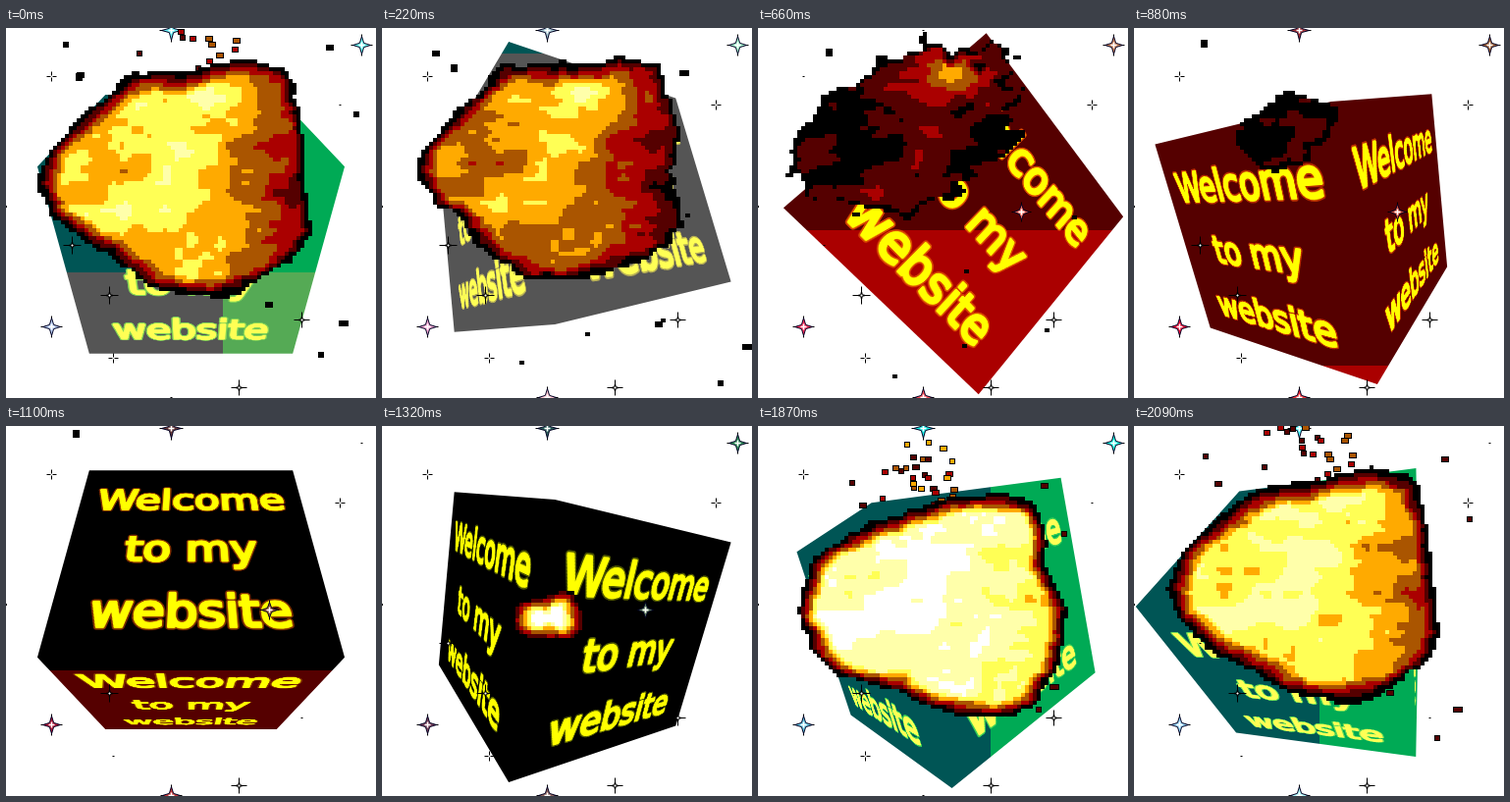
An HTML page with a canvas that plays this animation: 377 by 377 pixels, repeating every 2.2 s.

```html
<!DOCTYPE html>
<html lang="en">
<head>
<meta charset="utf-8">
<title>Welcome cube</title>
<style>
  html, body { margin: 0; width: 100%; height: 100%; overflow: hidden; background: #fff; }
  #stage { position: relative; width: 377px; height: 377px; overflow: hidden; }
  canvas { position: absolute; left: 0; top: 0; }
  .face { position: absolute; left: 0; top: 0; width: 400px; height: 400px; transform-origin: 0 0; }
  .face text {
    font: 37px "DejaVu Sans", sans-serif; text-anchor: middle;
    stroke-linejoin: round; fill: var(--ink); stroke: var(--ink); stroke-width: 2.6px;
  }
  .face .halo text { stroke: var(--halo); stroke-width: 5px; }
</style>
</head>
<body>
<div id="stage"></div>
<script>
const SIZE = 377, MID = SIZE / 2, STEP = 110, COUNT = 20;
const FOCAL = 331.6, EYE = 3.5, CELL = 4;
const TAU = Math.PI * 2;
const stage = document.getElementById('stage');
const clamp = (v, lo, hi) => Math.max(lo, Math.min(hi, v));
const mix = (a, b, k) => a + (b - a) * k;
const rgb = (...c) => `rgb(${c.map(v => Math.round(clamp(v, 0, 255))).join()})`;
const wave = (i, peak) => Math.cos((i - peak) / COUNT * TAU);

function addCanvas() {
  const c = document.createElement('canvas');
  c.width = c.height = SIZE;
  stage.append(c);
  return c.getContext('2d');
}

// Each face: normal, text direction, text up.
const FACES = [
  [[0, 0, 1], [1, 0, 0], [0, 1, 0]],
  [[0, 0, -1], [-1, 0, 0], [0, 1, 0]],
  [[1, 0, 0], [0, 0, -1], [0, 1, 0]],
  [[-1, 0, 0], [0, 0, 1], [0, 1, 0]],
  [[0, 1, 0], [0, 0, -1], [-1, 0, 0]],
  [[0, -1, 0], [0, 0, 1], [-1, 0, 0]]
];
const lines = ['Welcome', 'to my', 'website']
  .map((s, n) => `<text x="100" y="${57 + n * 60}">${s}</text>`).join('');

const back = addCanvas();
const labels = FACES.map(() => {
  stage.insertAdjacentHTML('beforeend',
    `<svg class="face" viewBox="0 0 200 200"><g class="halo">${lines}</g><g>${lines}</g></svg>`);
  return stage.lastElementChild;
});
const front = addCanvas();

// Colour of the cube: red grows downwards, green to the right, both swing in time.
const redWave = i => wave(i, 5), greenWave = i => wave(i, 18.65);
const level = (pos, w) => (pos + 380 * w - 249) / 318 + 1;
const blueOn = i => wave(i, 19) > 0.55;

function bands(w) {
  const cuts = [249, 567].map(c => clamp(Math.round(c - 380 * w), 0, SIZE));
  return [[0, cuts[0], 0], [cuts[0], cuts[1], 85], [cuts[1], SIZE, 170]].filter(b => b[1] > b[0]);
}

function rotator(i) {
  const roll = -Math.cos(i / 10 * TAU), yaw = (i - 15) / COUNT * TAU;
  const cr = Math.cos(roll), sr = Math.sin(roll), cy = Math.cos(yaw), sy = Math.sin(yaw);
  return ([x, y, z]) => {
    const u = x * cr - y * sr, v = x * sr + y * cr;
    return [u * cy + z * sy, -v, z * cy - u * sy];
  };
}

function drawCube(i) {
  const turn = rotator(i);
  back.clearRect(0, 0, SIZE, SIZE);
  back.save();
  back.beginPath();
  FACES.forEach((face, n) => {
    const [normal, right, up] = face.map(turn);
    const visible = normal[2] * EYE > 1;
    labels[n].style.display = visible ? '' : 'none';
    if (!visible) return;
    [[-1, -1], [1, -1], [1, 1], [-1, 1]].forEach(([a, b], k) => {
      const p = normal.map((v, d) => v + a * right[d] + b * up[d]);
      const s = FOCAL / (EYE - p[2]);
      back[k ? 'lineTo' : 'moveTo'](MID + p[0] * s, MID + p[1] * s);
    });
    back.closePath();
    // Homogeneous columns for x, y and the origin of the 400px label.
    const column = (v, w) => [FOCAL * v[0] + MID * w, FOCAL * v[1] + MID * w, 0, w];
    const dx = right.map(v => v / 200), dy = up.map(v => -v / 200);
    const origin = normal.map((v, d) => v - right[d] + up[d]);
    labels[n].style.transform = `matrix3d(${[
      ...column(dx, -dx[2]), ...column(dy, -dy[2]), 0, 0, 1, 0, ...column(origin, EYE - origin[2])
    ].map(v => v.toFixed(7))})`;
  });
  back.clip();
  const blue = blueOn(i) ? 85 : 0;
  for (const [y0, y1, red] of bands(redWave(i)))
    for (const [x0, x1, green] of bands(greenWave(i))) {
      back.fillStyle = rgb(red, green, blue);
      back.fillRect(x0, y0, x1 - x0, y1 - y0);
    }
  back.restore();
  stage.style.setProperty('--ink', rgb(255, 255, blue));
  stage.style.setProperty('--halo', rgb(130 + 90 * redWave(i), 130 + 90 * greenWave(i), blue));
}

// Stars: x, y, arm length, steps at which they go dim.
const STARS = [
  [168, 2, 12, [6, 14]], [362, 17, 11, [10, 19]], [46, 304, 11, [4]],
  [168, 376, 11, [0, 17]], [46, 49, 5, [6, 14]], [340, 78, 5, [0, 17]],
  [105, 272, 9, [14]], [67, 221, 9, [6, 10, 14, 17, 19]], [301, 297, 8, [10, 19]],
  [109, 336, 5, [10, 19]], [237, 366, 8, [4]], [268, 187, 10, [0, 4, 17, 19]]
];

function drawStar([x, y, arm, dim], i) {
  front.save();
  front.translate(x + 0.5, y + 0.5);
  if (dim.includes(i)) {
    front.fillStyle = '#000';
    front.fillRect(-1, -0.5, 2, 1);
    front.restore();
    return;
  }
  const cross = (len, width, color) => {
    front.fillStyle = color;
    front.fillRect(-len, -width / 2, len * 2, width);
    front.fillRect(-width / 2, -len, width, len * 2);
  };
  cross(arm, 1, '#000');
  if (arm > 9) {
    const color = rgb(85 + 85 * level(y, redWave(i)), 85 + 85 * level(x, greenWave(i)), 150 + 100 * wave(i, 19));
    front.beginPath();
    for (let k = 0; k < 8; k++) {
      const r = k % 2 ? 3 : arm - 2;
      front.lineTo(r * Math.cos(k * TAU / 8), r * Math.sin(k * TAU / 8));
    }
    front.closePath();
    front.fillStyle = color;
    front.strokeStyle = '#002';
    front.fill();
    front.stroke();
    cross(3, 1.5, '#fff');
  } else if (arm > 5) cross(3, 2, '#000');
  cross(1, 1, '#fff');
  front.restore();
}

// Fire: outline radii clockwise from the right, with heat, cooling to the right and a hot spot.
const HEAT = ['#000', '#500', '#a00', '#a50', '#fa0', '#ff5', '#ffa', '#fff'];
const KEYS = [
  { at: 14, x: 170, y: 195, heat: 8.3, cool: 0, spot: 0, rough: 0.06,
    r: [105, 110, 99, 76, 72, 74, 92, 108, 112, 107, 82, 66, 70, 89, 106, 103] },
  { at: 17, x: 180, y: 185, heat: 6.9, cool: 1.1, spot: 0, rough: 0.07,
    r: [135, 134, 143, 113, 103, 87, 105, 130, 135, 128, 110, 97, 105, 124, 147, 118] },
  { at: 20, x: 180, y: 155, heat: 5.1, cool: 2.4, spot: 0.5, rough: 0.08,
    r: [125, 140, 130, 122, 115, 106, 102, 128, 144, 128, 112, 119, 107, 130, 149, 130] },
  { at: 24, x: 170, y: 135, heat: 3.1, cool: 2.2, spot: 2.3, rough: 0.14,
    r: [122, 143, 120, 100, 102, 106, 104, 92, 128, 114, 102, 115, 105, 107, 138, 138] },
  { at: 26, x: 150, y: 110, heat: 1, cool: 0.6, spot: 2.8, rough: 0.35,
    r: [112, 75, 78, 70, 80, 86, 95, 108, 108, 98, 70, 75, 90, 103, 120, 125] }
];

function hash(x, y) {
  let h = Math.imul(x, 374761393) + Math.imul(y, 668265263);
  h = Math.imul(h ^ (h >>> 13), 1274126177);
  return ((h ^ (h >>> 16)) >>> 0) / 4294967296;
}
function smooth(x, y) {
  const a = Math.floor(x), b = Math.floor(y), ease = t => t * t * (3 - 2 * t);
  const u = ease(x - a), v = ease(y - b);
  return mix(mix(hash(a, b), hash(a + 1, b), u), mix(hash(a, b + 1), hash(a + 1, b + 1), u), v);
}
const noise = (x, y) => 0.62 * smooth(x / 36, y / 24) + 0.38 * smooth(x / 14 + 50, y / 8 + 50);

function fireState(e) {
  const last = KEYS.length - 1;
  const n = clamp(KEYS.findIndex(k => k.at > e) - 1, 0, last);
  if (e >= KEYS[last].at) {
    const fade = 1 - (e - 26) / 3.5;
    return { ...KEYS[last], heat: fade, spot: 2.8 * fade, r: KEYS[last].r.map(v => v * fade) };
  }
  if (e < KEYS[0].at) return { ...KEYS[0], r: KEYS[0].r.map(v => v * (e - 11) / 3) };
  const a = KEYS[n], b = KEYS[n + 1], k = (e - a.at) / (b.at - a.at), out = {};
  for (const name in a) out[name] = name === 'r' ? a.r.map((v, j) => mix(v, b.r[j], k)) : mix(a[name], b[name], k);
  return out;
}

function drawFire(e) {
  const s = fireState(e), drift = (e - 20) * 3;
  const spotX = mix(203, 192, clamp((e - 24) / 2, 0, 1)), spotY = mix(75, 40, clamp((e - 24) / 2, 0, 1));
  const rim = e < 18 ? 3 : 4;
  for (let y = 2; y < SIZE; y += CELL)
    for (let x = 2; x < SIZE; x += CELL) {
      const dx = x - s.x, dy = y - s.y;
      const turn = (Math.atan2(dy, dx) / TAU + 1) % 1 * 16, j = Math.floor(turn);
      const n = noise(x, y + drift + 200) - 0.5;
      const radius = mix(s.r[j % 16], s.r[(j + 1) % 16], turn - j) * (1 + s.rough * 1.6 * n);
      const depth = radius - Math.hypot(dx, dy) + 2;
      if (depth < 0) continue;
      const spot = s.spot * Math.exp(-((x - spotX) ** 2 + (y - spotY) ** 2) / 1300);
      const inside = s.heat + 3 * (noise(x + 300, y + drift) - 0.5) + spot - s.cool * Math.max(0, (x - 205) / 75);
      const heat = clamp(Math.floor(Math.min(inside, depth / rim - 0.4)), 0, 7);
      front.fillStyle = HEAT[heat];
      front.fillRect(x - 2, y - 2, CELL, CELL);
    }
}

function chunk(x, y, w, h, core) {
  front.fillStyle = '#000';
  front.fillRect(Math.round(x - w / 2), Math.round(y - h / 2), w, h);
  if (core) {
    front.fillStyle = core;
    front.fillRect(Math.round(x - w / 2) + 1, Math.round(y - h / 2) + 1, w - 2, h - 2);
  }
}

const SHARDS = [[61, 17], [76, 48], [344, 301], [321, 333], [268, 282], [290, 65], [357, 88], [330, 20]];
const EMBERS = [[290, 303], [210, 318], [317, 192], [212, 245], [141, 348]];

function drawDebris(e) {
  const fly = ([x, y], k) => [x + (x - 190) * k, y + (y - 170) * k];
  if (e >= 15 && e <= 22)
    SHARDS.forEach((p, n) => chunk(...fly(p, 0.09 * (e - 20)), 6 + n % 3 * 2, 6, e < 20 ? '#500' : ''));
  if (e >= 22 && e <= 27) EMBERS.forEach(p => chunk(...fly(p, 0.02 * (e - 24)), 5, 4));
  if (e >= 20) chunk(73 - 0.3 * (e - 24), 33 - 4.2 * (e - 24), 7, 8);
  if (e >= 14 && e <= 21)
    for (let n = 0; n < 30; n++) {
      const spread = 30 + (e - 14) * 6;
      const x = 168 + (e - 17) * 8 + (hash(n, 3) + hash(n, 9) - 1) * spread;
      const y = 60 - (e - 17) * 18 + (hash(n, 5) + hash(n, 7) - 1) * spread;
      chunk(x, y, 6 + n % 3, 6, HEAT[1 + n % (e < 19 ? 4 : 3)]);
    }
}

function draw(i) {
  const e = i < 12 ? i + COUNT : i;
  drawCube(i);
  front.clearRect(0, 0, SIZE, SIZE);
  STARS.forEach(star => drawStar(star, i));
  front.fillStyle = '#000';
  front.fillRect(0, 181, 1, 2);
  drawDebris(e);
  if (e < 29) drawFire(e);
}

const start = performance.now();
let shown = -1;
function tick() {
  const i = Math.floor((performance.now() - start) / STEP) % COUNT;
  if (i !== shown) draw(shown = i);
  requestAnimationFrame(tick);
}
tick();
</script>
</body>
</html>
```
